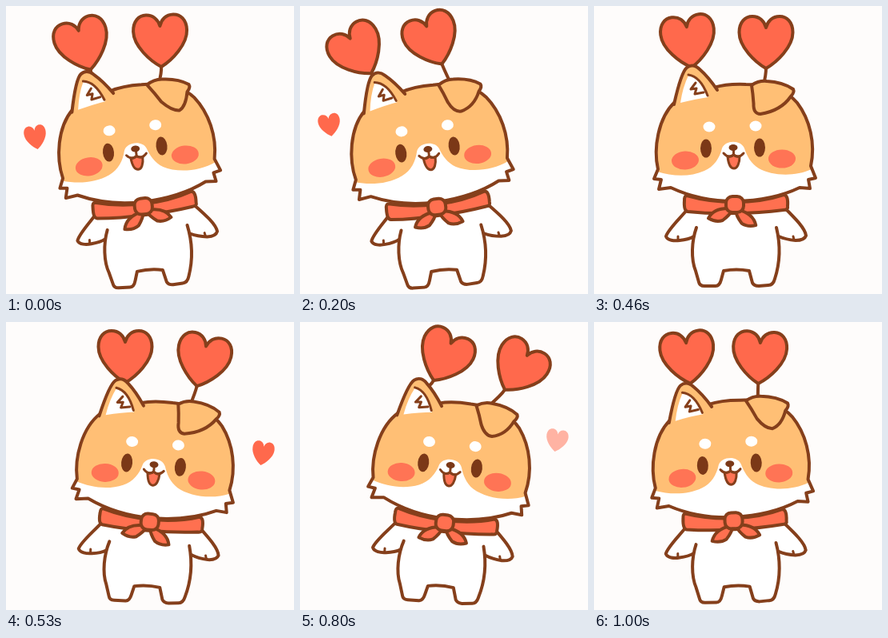
Animation, 360 px wide and 360 px high, one loop 1060 ms. Source, as an HTML page:

```html
<!DOCTYPE html>
<html lang="en">
<head>
<meta charset="utf-8">
<title>Swaying puppy</title>
<style>
  html, body { margin: 0; width: 100%; height: 100%; overflow: hidden; background: #fefcfb; }
  svg { display: block; width: 100vw; height: 100vh; }
  .line { fill: none; stroke: #853f1b; stroke-width: 4; stroke-linecap: round; stroke-linejoin: round; }
  .white { fill: #fff; }
  .tan { fill: #ffbf75; }
  .red { fill: #ff694c; }
  .dark { fill: #7b3817; }
  .thin { stroke-width: 3; }
</style>
</head>
<body>
<svg viewBox="0 0 360 360">
  <defs>
    <path id="heart" d="M0,33 C-14,25 -33.5,6 -33.5,-12 C-33.5,-25 -26,-32 -17,-32 C-8,-32 -2,-26 0,-18 C2,-26 8,-32 17,-32 C26,-32 33.5,-25 33.5,-12 C33.5,6 14,25 0,33Z"/>
    <path id="skull" d="M80,204 L75,216 L84,217 L81,229 L96,227 Q132,244 176,244 Q224,243 257,227 L270,228 L268,217 L277,215 L271,200 C277,172 270,142 254,121 C238,102 212,98 190,98 Q166,97 150,102 Q118,106 101,120 C80,140 74,178 80,204Z"/>
    <clipPath id="skullClip"><use href="#skull"/></clipPath>
  </defs>

  <use id="floatLeft" class="red" href="#heart"/>
  <use id="floatRight" class="red" href="#heart"/>

  <path id="stemLeft" class="line"/>
  <path id="stemRight" class="line"/>
  <use id="heartLeft" class="line red" style="fill:#ff694c" href="#heart"/>
  <use id="heartRight" class="line red" style="fill:#ff694c" href="#heart"/>

  <g id="body">
    <path class="white" d="M117,252 L238,252 L232,295 L124,295Z"/>
    <path class="line" style="fill:#fff" d="M117,254 C106,267 92,280 90,288 C92,293 100,294 107,293 Q118,292 125,288"/>
    <path class="line" style="fill:#fff" d="M238,252 C252,266 264,278 265,287 Q263,293 252,293 Q240,292 231,288"/>
    <path class="line" style="fill:#fff" d="M128,277 C122,294 121,316 127,331 L131,345 Q132,350 138,350 L152,350 Q157,350 159,342 L162,331 Q178,328 194,331 L198,346 Q200,350 206,350 L218,349 Q224,349 226,341 Q236,310 228,277"/>
    <path class="line thin" d="M105,292 L105,288 M250,292 L249,288"/>
  </g>

  <g id="head">
    <use class="white" href="#skull"/>
    <path class="tan" clip-path="url(#skullClip)" d="M60,80 H290 V196 L272,204 C250,214 222,212 206,203 C196,197 191,187 188,178 C184,167 164,167 160,178 C157,190 150,201 138,206 C120,214 98,213 79,207 L60,200Z"/>
    <use class="line" href="#skull"/>

    <path class="tan" d="M100,123 C104,105 110,82 116,77 C121,73 127,74 132,79 C140,86 148,96 154,105 L140,128Z"/>
    <path class="white" d="M108,121 Q111,101 118,87 Q133,89 143,114 Q128,116 108,121Z"/>
    <path class="line" d="M100,123 C104,105 110,82 116,77 C121,73 127,74 132,79 C140,86 148,96 154,105"/>
    <path class="line thin" d="M118,86 Q133,88 142,112 M127,96 L121,104 L128,103 L126,110 L137,108"/>
    <path id="earRight" class="line" style="fill:#ffbf75"/>

    <ellipse fill="#ff7455" cx="114" cy="193" rx="17" ry="11.5" transform="rotate(-3 114 193)"/>
    <ellipse fill="#ff7455" cx="235" cy="191" rx="17" ry="11.5"/>
    <ellipse class="white" cx="144" cy="151" rx="7.5" ry="6.5"/>
    <ellipse class="white" cx="202" cy="150" rx="7.5" ry="6.5"/>
    <ellipse class="dark" cx="140" cy="178" rx="7" ry="11.5"/>
    <ellipse class="dark" cx="207" cy="177" rx="7" ry="11.5"/>

    <path class="line thin" style="fill:#ff7455" d="M167,188 C168,198 171,203 175,203 C179,203 182,197 182,188 Q178,189 174.5,186 Q171,189 167,188Z"/>
    <path class="line thin" d="M162,184 Q168,191 174.5,186 Q181,191 187,184 M174.500,186 V179"/>
    <ellipse class="dark" cx="174" cy="177" rx="5.5" ry="4"/>
  </g>

  <g id="scarf">
    <path class="line" style="fill:#ff7050" d="M-60,-10 Q-32,-2 0,-2 Q34,-2 61,-11 Q67,-11 66,3 Q67,8 61,8 Q30,12 0,12 Q-30,13 -59,10 Q-64,9 -63,-4 Q-63,-10 -60,-10Z"/>
    <g id="tails">
      <path class="line" style="fill:#ff7050" d="M-5,7 Q-25,9 -30,23 Q-20,27 -12,23 Q-4,15 -2,8Z"/>
      <path class="line" style="fill:#ff7050" d="M5,7 Q25,9 30,23 Q20,27 12,23 Q4,15 2,8Z"/>
    </g>
    <rect class="line" style="fill:#ff7050" x="-11" y="-9" width="22" height="20" rx="8"/>
  </g>
</svg>

<script>
const LOOP = 1060, STEPS = 16;
const NOSE = { x: 174, y: 178 };
const el = Object.fromEntries([...document.querySelectorAll('svg [id]')].map(n => [n.id, n]));

// step, sway, ear flop, left heart x y angle, right heart x y angle
const POSES = [
  [0, -.87, 13, 96, 48, -17, 193, 43, -2],
  [2, -1, 3, 83, 52, -25, 179, 42, -10],
  [3, -1, 0, 72, 56, -31, 165, 42, -22],
  [5, -1, 0, 68, 57, -33, 161, 43, -25],
  [7, 0, -13, 118, 44, -7, 215, 45, 0],
  [8, .78, -13, 149, 43, 0, 246, 48, 13],
  [10, 1, -2, 161, 43, 3, 257, 52, 20],
  [12, 1, 0, 181, 43, 25, 274, 57, 33],
  [13, 1, 0, 181, 43, 25, 274, 57, 33],
  [15, -.3, 8, 117, 44, -6, 207, 44, 3],
  [16, -.87, 13, 96, 48, -17, 193, 43, -2],
];

function poseAt(step) {
  const i = POSES.findIndex(p => p[0] > step);
  const a = POSES[i - 1], b = POSES[i];
  const k = (step - a[0]) / (b[0] - a[0]);
  return a.map((v, j) => v + (b[j] - v) * k);
}

function turn(x, y, deg) {
  const r = deg * Math.PI / 180, c = Math.cos(r), s = Math.sin(r);
  return [x * c - y * s, x * s + y * c];
}

const set = (id, name, value) => el[id].setAttribute(name, value);
const place = (id, x, y, deg, extra = '') =>
  set(id, 'transform', `translate(${x} ${y}) rotate(${deg}) ${extra}`);

function drawBopper(side, x, y, deg, anchor) {
  place('heart' + side, x, y, deg);
  const [dx, dy] = turn(0, 33, deg), [bx, by] = turn(0, 41, deg);
  set('stem' + side, 'd', `M${x + dx},${y + dy} Q${x + bx},${y + by} ${anchor[0]},${anchor[1]}`);
}

function drawFloat(side, x, age, tilt) {
  const visible = age >= 0 && age < 5;
  set('float' + side, 'opacity', !visible ? 0 : age === 4 ? .5 : 1);
  if (!visible) return;
  const y = 148 + 16 * (1 - age / 4) ** 2.3;
  place('float' + side, x, y, tilt, `scale(.41 ${age ? .43 : .46})`);
}

function drawEar(flop) {
  const tip = 221 + flop;
  set('earRight', 'd', `M197,99 Q206,93 216,94 Q236,95 249,104 Q251,108 246,113
    Q${238 + flop / 3},131 ${tip},135 Q${tip - 9},135 ${206 + flop / 2},122 Q${202 + flop / 4},110 197,99`);
}

function draw(ms) {
  const step = Math.min(STEPS - 1, Math.floor((ms % LOOP + 4) * STEPS / LOOP));
  const [, sway, flop, lx, ly, la, rx, ry, ra] = poseAt(step);
  const angle = 7 * sway, lift = sway * sway;
  const hx = NOSE.x + 14 * sway, hy = NOSE.y + 2 * lift;
  const onHead = (x, y) => {
    const [dx, dy] = turn(x - NOSE.x, y - NOSE.y, angle);
    return [hx + dx, hy + dy];
  };

  set('body', 'transform', `rotate(${4 * sway} 177 300)`);
  place('head', hx, hy, angle, `translate(${-NOSE.x} ${-NOSE.y})`);
  place('scarf', 176 + 5 * sway, 247 + 3 * lift, angle);
  set('tails', 'transform', `rotate(${-.65 * flop})`);
  drawEar(flop);
  drawBopper('Left', lx, ly, la, onHead(124, 92));
  drawBopper('Right', rx, ry, ra, onHead(212, 98));
  drawFloat('Left', 37, step, -10);
  drawFloat('Right', 321, step - 8, 10);
}

const start = performance.now();
function tick() {
  draw(performance.now() - start);
  requestAnimationFrame(tick);
}
tick();
</script>
</body>
</html>
```
